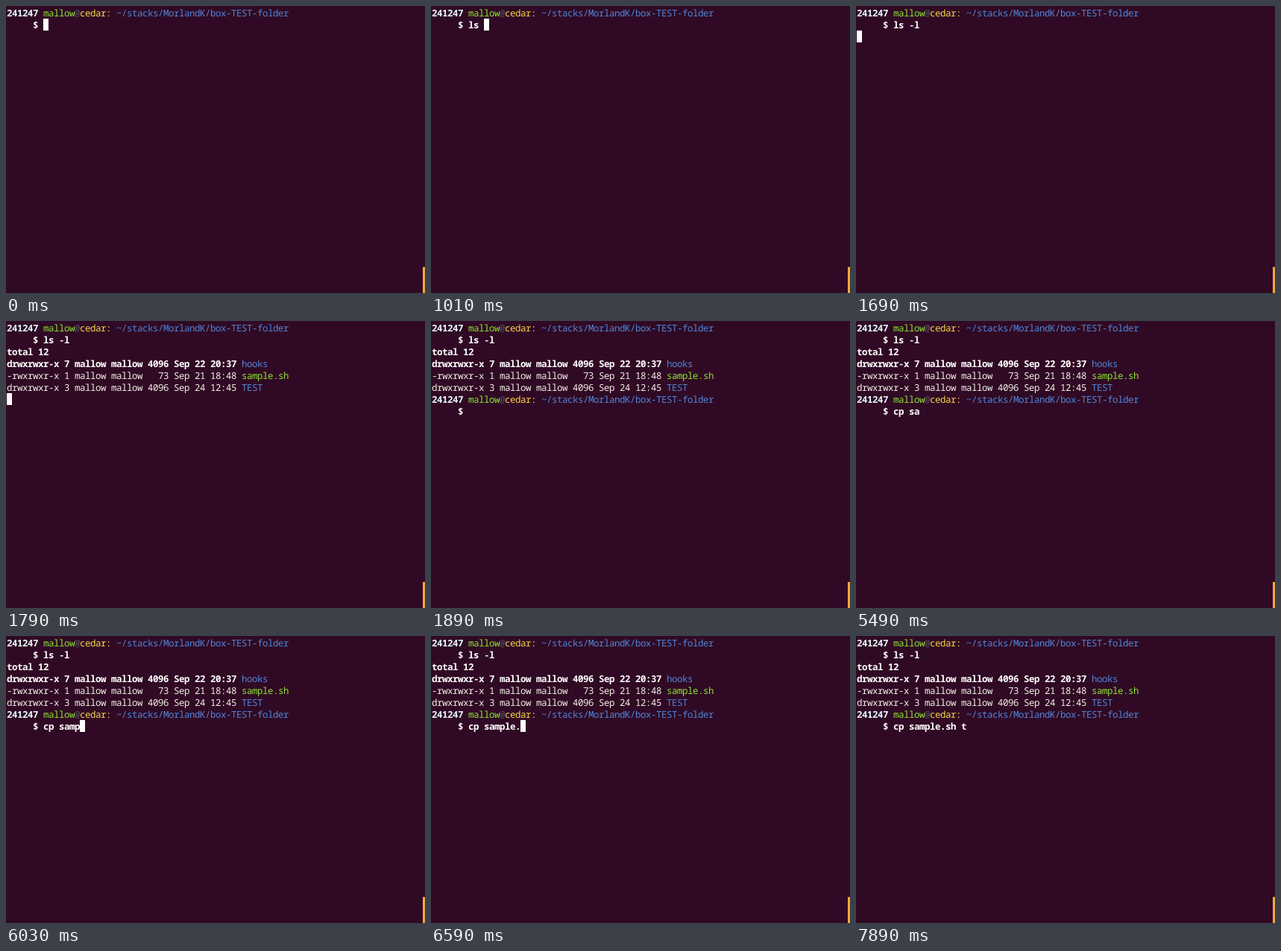
These frames come from a looping animation (562 by 386 pixels, 8 s). An HTML page:

```html
<!DOCTYPE html>
<html lang="en">
<head>
<meta charset="utf-8">
<title>Terminal session</title>
<style>
  html, body { margin: 0; width: 100%; height: 100%; overflow: hidden; background: #300a24; }
  svg { display: block; width: 562px; height: 386px; }

  /* 7 x 16 px character cells */
  text {
    font: 500 12.5px "Noto Sans Mono", "DejaVu Sans Mono", monospace;
    letter-spacing: calc(7px - 0.6em);
    text-rendering: geometricPrecision;
    white-space: pre;
    fill: #f3efe6;
  }
  .bold { font-weight: 600; fill: #fff; }
  .num { font-weight: 600; fill: #e6fbff; }
  .user, .exec { fill: #8ae234; }
  .at { fill: #5c5368; }
  .host { fill: #f8d648; }
  .dir { fill: #5085da; }

  .cover { fill: #300a24; }
  .caret { fill: #fff; }
  .bar { fill: #f2a83b; }

  .cover, .caret, .output, .prompt { animation: 8s step-end infinite; }
  .ls { animation-name: type-ls; }
  .cp { animation-name: type-cp; }
  .caret { animation-name: caret; }
  .output { opacity: 0; animation-name: output; }
  .prompt { opacity: 0; animation-name: prompt; }

  @keyframes type-ls {
    0% { transform: none; }
    6.25% { transform: translateX(7px); }
    9.875% { transform: translateX(14px); }
    12.625% { transform: translateX(21px); }
    15.125% { transform: translateX(28px); }
    16.625%, 100% { transform: translateX(35px); }
  }
  @keyframes type-cp {
    0% { transform: none; }
    56.25% { transform: translateX(7px); }
    59% { transform: translateX(14px); }
    62.5% { transform: translateX(21px); }
    65.875% { transform: translateX(28px); }
    68.625% { transform: translateX(35px); }
    71.25% { transform: translateX(42px); }
    75.375% { transform: translateX(49px); }
    76.125% { transform: translateX(56px); }
    79.5% { transform: translateX(63px); }
    82.375% { transform: translateX(70px); }
    86.125% { transform: translateX(77px); }
    88.25% { transform: translateX(84px); }
    94.75% { transform: translateX(91px); }
    98.625%, 100% { transform: translateX(98px); }
  }
  @keyframes caret {
    0% { transform: translate(49px, 16px); opacity: 1; }
    6.25% { transform: translate(56px, 16px); }
    9.875% { transform: translate(63px, 16px); }
    12.625% { transform: translate(70px, 16px); }
    15.125% { transform: translate(77px, 16px); }
    16.625% { transform: translate(84px, 16px); }
    21.125% { transform: translate(0, 32px); }
    22.375% { transform: translate(0, 96px); }
    23.625% { opacity: 0; }
    71.25% { transform: translate(91px, 112px); opacity: 1; }
    75.375% { transform: translate(98px, 112px); }
    76.125% { transform: translate(105px, 112px); }
    79.5% { transform: translate(112px, 112px); }
    82.375% { transform: translate(119px, 112px); }
    86.125% { transform: translate(126px, 112px); }
    88.25% { transform: translate(133px, 112px); }
    94.75%, 100% { opacity: 0; }
  }
  @keyframes output {
    0% { opacity: 0; }
    22.375%, 100% { opacity: 1; }
  }
  @keyframes prompt {
    0% { opacity: 0; }
    23.625%, 100% { opacity: 1; }
  }
</style>
</head>
<body>
<svg viewBox="0 0 562 386">
  <defs>
    <g id="ps1">
      <text x="1" y="14" class="num">241247</text>
      <text x="50" y="14"><tspan class="user">mallow</tspan><tspan class="at">@</tspan><tspan class="host">cedar:</tspan></text>
      <text x="148" y="14" class="dir">~/stacks/MorlandK/box-TEST-folder</text>
      <text x="36" y="30" class="bold">$</text>
    </g>
  </defs>

  <use href="#ps1"/>
  <text x="50" y="30" class="bold">ls -l</text>
  <rect class="cover ls" x="50" y="17" width="42" height="16"/>

  <g class="output">
    <text x="1" y="46" class="bold">total 12</text>
    <text x="1" y="62" class="bold" xml:space="preserve">drwxrwxr-x 7 mallow mallow 4096 Sep 22 20:37</text>
    <text x="316" y="62" class="dir">hooks</text>
    <text x="1" y="78" xml:space="preserve">-rwxrwxr-x 1 mallow mallow   73 Sep 21 18:48</text>
    <text x="316" y="78" class="exec">sample.sh</text>
    <text x="1" y="94" xml:space="preserve">drwxrwxr-x 3 mallow mallow 4096 Sep 24 12:45</text>
    <text x="316" y="94" class="dir">TEST</text>
  </g>

  <g class="prompt">
    <use href="#ps1" y="96"/>
    <text x="50" y="126" class="bold">cp sample.sh t</text>
    <rect class="cover cp" x="50" y="113" width="105" height="17"/>
  </g>

  <rect class="caret" x="1" y="1" width="7" height="16"/>
  <rect class="bar" x="559" y="351" width="3" height="35"/>
</svg>
</body>
</html>
```
